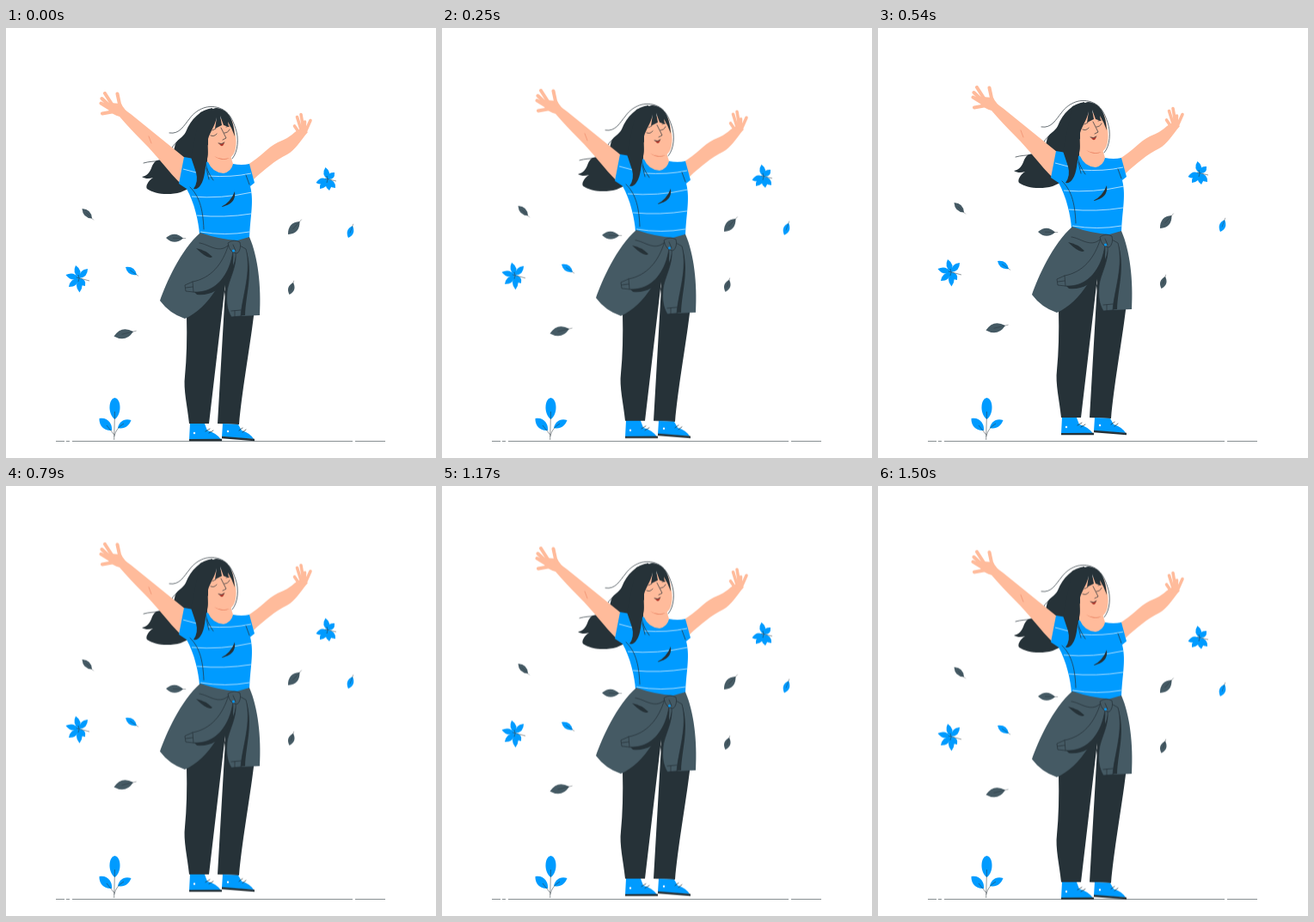
An HTML page that plays this animation: 500x500 px, repeating every 1.54 s.

```html
<!DOCTYPE html>
<html lang="en">
<head>
<meta charset="utf-8">
<title>Breeze</title>
<style>
  html, body { margin: 0; width: 100%; height: 100%; overflow: hidden; background: #fff; }
  svg { display: block; width: 100vw; height: 100vh; }
  .blue { fill: #009bff; }
  .dark { fill: #263238; }
  .gray { fill: #455a64; }
  .skin { fill: #ffbb9b; }
  .line { fill: none; stroke: #263238; stroke-width: .7; stroke-linecap: round; stroke-linejoin: round; }
  .ground { fill: none; stroke: #263238; stroke-width: .55; }
  .cloth { fill: #455a64; stroke: #263238; stroke-width: .7; stroke-linejoin: round; }
  .finger { fill: none; stroke: #ffbb9b; stroke-width: 4; stroke-linecap: round; stroke-linejoin: round; }
  .stripe { fill: none; stroke: #e3f2fd; stroke-width: .75; }
</style>
</head>
<body>
<svg viewBox="0 0 500 500">
  <path class="ground" d="M58 480.500H68M70 480.500H74M77 480.500H403M406 480.500H441"/>
  <g id="plant"></g>
  <g id="drift">
    <g id="leaves"></g>

    <!-- flowing hair -->
    <path class="dark" d="M240 93C226 95 215 106 209 121C206 128 197 129 196 139C194 147 188 152 181 154C174 152 171 158 169 163C167 168 164 172 158 173C163 176 167 175 171 174C165 178 162 184 164 187C172 193 189 195 203 191L214 186L234 178L240 130Z"/>
    <path class="line" d="M190 122C202 124 207 113 213 106C220 96 233 88 248 93C260 97 264 108 267 117C271 128 270 144 263 152M160 157C174 153 180 158 190 147M192 141C198 129 207 130 210 122"/>

    <!-- arms -->
    <path class="skin" d="M134 88Q137 95 145 100L208 151L203 181C190 168 175 148 160 133Q144 117 132 103Q124 101 119 95L121 87Z"/>
    <path class="finger" d="M133 93L129.500 76.500M124 90L115 76M122 92L111.500 82M121 94L110.500 87.500M126 97L112 99.500"/>
    <path class="line" style="stroke:#ee8b6b" d="M166 126L169 134"/>
    <path class="skin" d="M281 159C296 150 304 139 316 133Q329 128 336 121L344 116L351 121C341 133 336 142 327 147C313 154 301 164 288 176Z"/>
    <path class="finger" style="stroke-width:3.600" d="M341 122L335.500 114M343 118L338.500 103.500M346 118L343 100.500M347 119L347.500 109M348 121L354 107.500"/>

    <!-- trousers -->
    <path class="dark" d="M211 325L252 262L256 290L254 306L236 460H213C211 440 206 420 208 405Q211 374 210 335Z"/>
    <path class="dark" d="M253 290L266 255L290 320L288 335C283 375 274 425 271 461L246 460L255 304Z"/>

    <!-- shoes -->
    <path class="blue" d="M214 460H231L234 468Q245 471 250 478.500L213 479Z"/>
    <path class="blue" d="M252 460L270 461L274 468Q284 471 288 478L251 475.500Z"/>
    <path class="dark" d="M213 478L251 477.800V480.300H213ZM251 474.800L289 477.700V480.300L251 477.200Z"/>
    <path class="line" d="M232 469L237 466M236 471L241 468M271 468L275 465M275 470L279 467"/>
    <circle cx="219" cy="471" r="1.200" fill="#fff"/>
    <circle cx="258" cy="469" r="1.200" fill="#fff"/>

    <!-- neck and shirt -->
    <path class="skin" d="M234 136V172H262L264 158L260 145Z"/>
    <path class="blue" d="M207 150Q222 152 235 156Q240 168 253 169Q262 167 264 158Q274 160 283 158L289 180L284 184C289 204 283 222 283 250H225V240C224 225 219 203 210 187L201 181Z"/>
    <path class="stripe" d="M235 172Q262 174 285 169M216 196Q250 199 286 191M222 218Q254 221 285 216M226 237Q255 242 283 237M206 164L221 168"/>
    <path class="dark" d="M266 190Q268 205 250 208Q261 203 266 190Z"/>
    <path class="line" d="M214 185C224 195 229 208 230 234M283 182L279 171"/>

    <!-- tied jacket -->
    <path class="gray" d="M226 238Q249 246 269 247L283 243C293 266 297 300 295 334L273 335L262 260C257 288 236 326 208 338Q190 332 179 317C186 297 203 258 226 238Z"/>
    <path class="dark" d="M268 258C267 276 256 293 254 307L258 330L266 300Z"/>
    <path class="dark" d="M221 256Q232 258 240 266Q235 270 221 256Z"/>
    <path class="dark" d="M218 306C244 309 261 286 264 259C267 286 250 313 222 310Z"/>
    <path class="dark" d="M270 335C275 311 285 283 279 257C288 285 279 308 278 334Z"/>
    <path class="cloth" d="M259 251C252 275 238 291 217 295L208 299L209 306L218 307C244 309 261 286 264 259Z"/>
    <path class="cloth" d="M267 260C269 278 258 294 257 307C256 320 257 327 262 336L273 335C275 311 286 283 279 257L270 252Z"/>
    <path class="cloth" d="M258 250Q265 245 272 249Q274 257 269 262Q260 262 258 250Z"/>
    <path class="line" d="M225 250C235 251 247 263 258 253M209 302L217 301M217 295L218 307M262 329L273 328M266 329V336M264 252L267 259"/>
    <circle class="blue" cx="264.500" cy="259" r="1.500"/>

    <!-- head -->
    <path class="skin" d="M235 120C238 106 254 102 263 108C266 118 269 130 267 140C265 150 259 154 251 152C242 151 236 146 235 137Z"/>
    <path d="M242 149Q250 154 260 151Q252 156 242 149Z" fill="#e98262"/>
    <path class="dark" d="M226 98L244 93C259 94 265 107 266 126Q263 117 258 109L259 115L253 113L249 102L251 113L243 117L245 104C243 114 237 121 235 129C234 138 236 146 234 152C231 161 232 175 226 183Q223 188 218 187Q224 179 221 168L215 150Z"/>
    <path class="line" d="M232 157C234 166 237 171 241 177M233 163L236 176"/>
    <path class="line" d="M238 125Q242 127 245 123M254 122Q258 122 260 118M250 116L256 128L252 130M240 119L244 117M256 115L260 114"/>
    <path d="M247 134Q251 136 254 133Q253 138 250 137Z" fill="#b33b2e"/>
    <path class="line" d="M247 134Q251 136 254 133"/>
  </g>
</svg>
<script>
  const BLUE = '#009bff', GRAY = '#455a64', DARK = '#263238';
  const plant = document.getElementById('plant');
  const leaves = document.getElementById('leaves');

  function add(parent, d, fill, stroke, width = .5) {
    const p = document.createElementNS('http://www.w3.org/2000/svg', 'path');
    p.setAttribute('d', d);
    p.setAttribute('fill', fill);
    if (stroke) {
      p.setAttribute('stroke', stroke);
      p.setAttribute('stroke-width', width);
    }
    parent.append(p);
  }

  // Pointed blade from tip to base, w is half its breadth.
  function blade(x1, y1, x2, y2, w) {
    const len = Math.hypot(x2 - x1, y2 - y1);
    const nx = (y1 - y2) / len * w * 2, ny = (x2 - x1) / len * w * 2;
    const mx = (x1 + x2) / 2, my = (y1 + y2) / 2;
    return `M${x1} ${y1}Q${mx + nx} ${my + ny} ${x2} ${y2}Q${mx - nx} ${my - ny} ${x1} ${y1}Z`;
  }

  function leaf(x1, y1, x2, y2, w, fill) {
    const dx = x2 - x1, dy = y2 - y1;
    add(leaves, blade(x1, y1, x2, y2, w), fill);
    add(leaves, `M${x1 + dx * .4} ${y1 + dy * .4}L${x2 + dx * .16} ${y2 + dy * .16}`, 'none', DARK, .4);
  }

  function star(cx, cy, tips, stem) {
    tips.forEach(([x, y]) => add(leaves, blade(x, y, cx, cy, 3.4), BLUE));
    add(leaves, `M${cx - 3} ${cy - 1}L${stem}M${cx - 1} ${cy - 4}L${cx} ${cy}L${cx - 1} ${cy + 4}`, 'none', DARK);
  }

  leaf(88.5, 210, 100, 221.5, 3.6, GRAY);
  leaf(186, 244, 206, 244.5, 4.6, GRAY);
  leaf(328, 240, 341.5, 225, 4.8, GRAY);
  leaf(329.5, 310, 334, 296, 3.6, GRAY);
  leaf(125.5, 358.5, 148, 353, 5.4, GRAY);
  leaf(398, 244, 403, 230, 3.6, BLUE);
  leaf(139, 278, 152, 287, 3.6, BLUE);
  star(85, 291, [[69.5, 287], [81, 276], [95, 280], [92, 300], [85.5, 307.5], [73, 301]], '97 294');
  star(374, 176, [[360.5, 180], [371.5, 162], [382, 168], [383, 186], [376, 189], [365, 187]], '384 178');

  add(plant, 'M126.500 430C134 431 135 449 126.500 455C118 449 119 431 126.500 430Z', BLUE);
  add(plant, 'M108.500 454C118 452 124 460 123 468C115 469 108 463 108.500 454Z', BLUE);
  add(plant, 'M145.500 456C137 453 131 459 130 465C137 467 143 463 145.500 456Z', BLUE);
  add(plant, 'M126.500 446L125.700 479M117 462L125.800 473M137 460Q128 465 125.800 475', 'none', DARK);

  const rise = y => `translateY(${y}px)`;
  document.getElementById('drift').animate([
    { offset: 0, transform: rise(0) },
    { offset: 720 / 1540, transform: rise(-9.35) },
    { offset: 1490 / 1540, transform: rise(.65) },
    { offset: 1, transform: rise(0) }
  ], { duration: 1540, iterations: Infinity });
</script>
</body>
</html>
```
